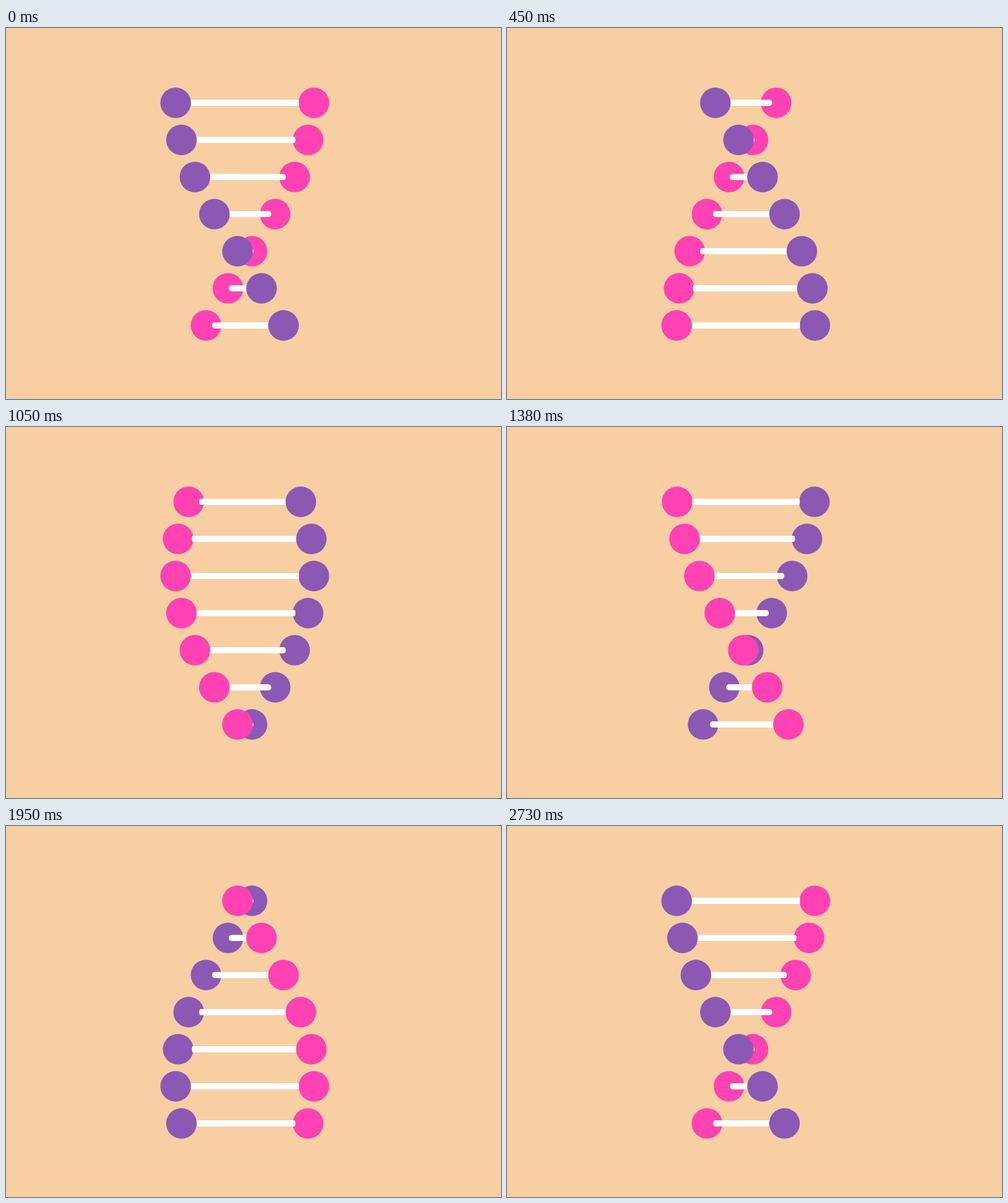
An HTML page with a canvas that plays this animation: 800 px wide and 600 px high, repeating every 2760 ms.

```html
<!DOCTYPE html>
<html lang="en">
<head>
<meta charset="utf-8">
<title>Rotating double helix</title>
<style>
  html, body { margin: 0; width: 100%; height: 100%; overflow: hidden; background: #f8cfa3; }
  canvas { display: block; }
</style>
</head>
<body>
<canvas id="stage" width="800" height="600"></canvas>
<script>
const ctx = document.getElementById('stage').getContext('2d');

const STEP_MS = 30, LOOP_MS = 2760, TURN_STEPS = 90;
const ROWS = 7, CENTER_X = 385.9, TOP = 121, ROW_GAP = 60;
const START_DEG = 86, ROW_DEG = 20;
const ORBIT = 112, BALL_RADIUS = 24.75;
const ROD_HALF = 87.5, ROD_RADIUS = 4.9;
const BG = '#f8cfa3', PURPLE = '#8d58b3', PINK = '#ff42b3', WHITE = '#ffffff';

function ball(x, y, color) {
  ctx.fillStyle = color;
  ctx.beginPath();
  ctx.arc(x, y, BALL_RADIUS, 0, Math.PI * 2);
  ctx.fill();
}

// A cylinder seen from the side: its end discs foreshorten into ellipses.
function rod(y, sin, cos) {
  const half = ROD_HALF * Math.abs(sin);
  const capWidth = ROD_RADIUS * Math.abs(cos);
  const quarter = Math.PI / 2;
  ctx.fillStyle = WHITE;
  ctx.beginPath();
  ctx.ellipse(CENTER_X + half, y, capWidth, ROD_RADIUS, 0, -quarter, quarter);
  ctx.ellipse(CENTER_X - half, y, capWidth, ROD_RADIUS, 0, quarter, 3 * quarter);
  ctx.closePath();
  ctx.fill();
}

function drawRow(row, turn) {
  const angle = (START_DEG - ROW_DEG * row - turn) * Math.PI / 180;
  const sin = Math.sin(angle), cos = Math.cos(angle);
  const y = TOP + ROW_GAP * row;
  const balls = [
    { x: CENTER_X - ORBIT * sin, color: PURPLE },
    { x: CENTER_X + ORBIT * sin, color: PINK }
  ];
  const [near, far] = cos > 0 ? balls : balls.reverse();
  ball(far.x, y, far.color);
  rod(y, sin, cos);
  ball(near.x, y, near.color);
}

function draw(ms) {
  const step = Math.min(Math.floor((ms % LOOP_MS) / STEP_MS), TURN_STEPS);
  ctx.fillStyle = BG;
  ctx.fillRect(0, 0, 800, 600);
  for (let row = 0; row < ROWS; row++) drawRow(row, step * 360 / TURN_STEPS);
}

const start = performance.now();
function tick() {
  draw(Math.max(0, performance.now() - start));
  requestAnimationFrame(tick);
}
tick();
</script>
</body>
</html>
```
